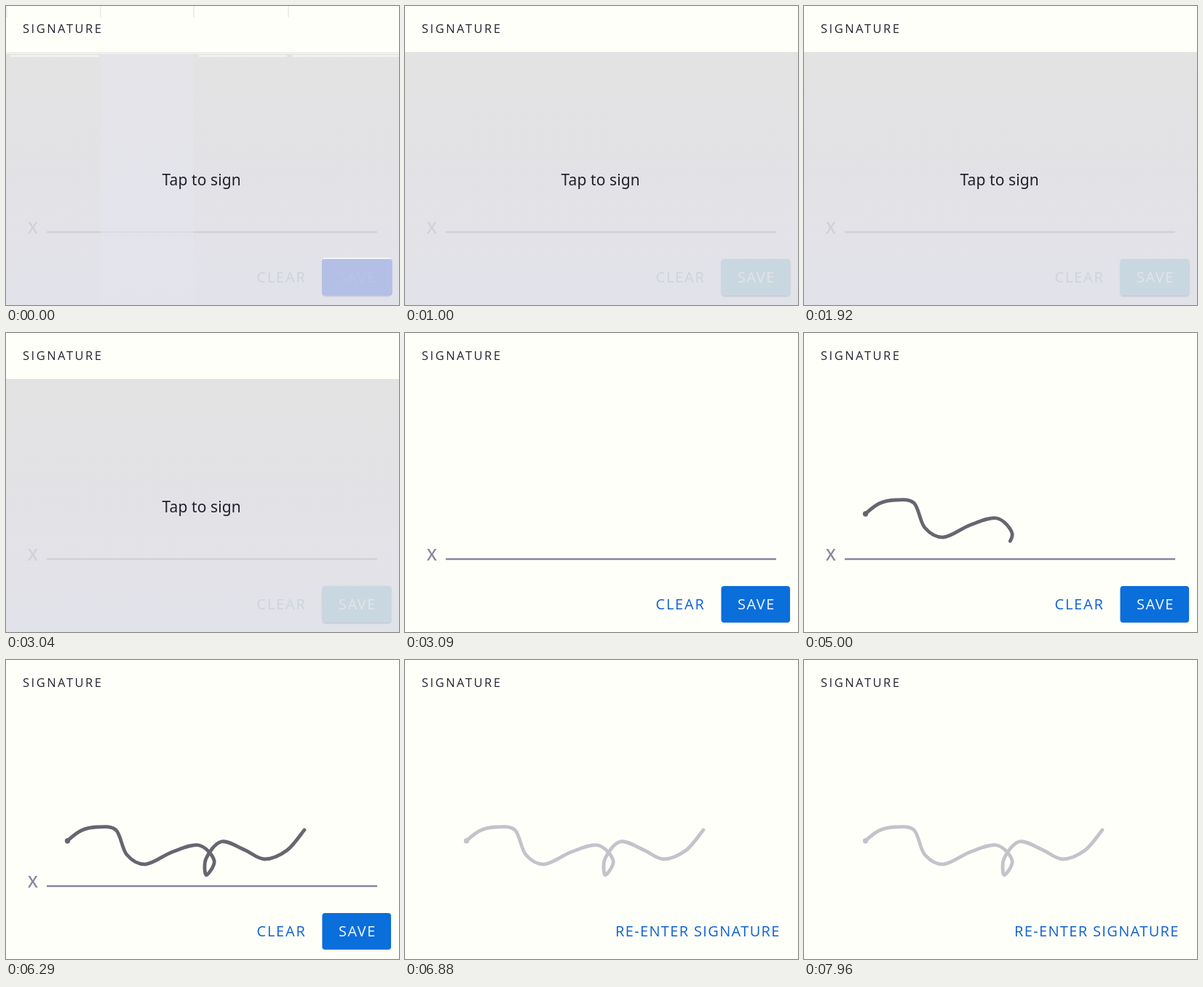
An HTML page for the animation above (8000 ms loop, 540 by 410 pixels).

```html
<!DOCTYPE html>
<html lang="en">
<head>
<meta charset="utf-8">
<title>Signature</title>
<style>
  html, body { margin: 0; width: 100%; height: 100%; overflow: hidden; background: #fffffa; }
  svg { display: block; width: 540px; height: 410px; font: 20px "Open Sans", sans-serif; letter-spacing: 1.5px; }
  .heading { font-size: 16.5px; letter-spacing: 2.5px; fill: #23232e; }
  .prompt { font: 21px "Noto Sans", sans-serif; letter-spacing: .1px; fill: #20202c; }
  .mark { font-size: 22px; font-weight: 600; fill: #85889f; }
  .rule { stroke: #85879f; stroke-width: 2.6; }
  .clear, .redo { fill: #0d61d3; }
  .clear { letter-spacing: 1.8px; }
  .redo { letter-spacing: 1.35px; }
  .button { fill: #0a6edb; }
  .save { fill: #f4f9ff; }
  .ink { fill: none; stroke: currentColor; stroke-width: 4.8; stroke-linecap: round; stroke-linejoin: round; }
  .dot { fill: currentColor; }
  #signature { color: #66666f; }
  .done #signature { color: #c3c3ca; }
  .locked .mark { fill: #d1d1d3; }
  .locked .rule { stroke: #d2d2d3; }
  .locked .clear { fill: #cdd4da; }
  .locked .button { fill: #c9d7e1; }
  .locked .save { fill: #e2e5e8; }
</style>
</head>
<body>
<svg id="stage" viewBox="0 0 540 410">
  <defs>
    <linearGradient id="shade" x2="0" y2="1">
      <stop offset="0" stop-color="#e3e3e3"/>
      <stop offset="1" stop-color="#e2e2ea"/>
    </linearGradient>
    <filter id="soft"><feGaussianBlur stdDeviation="1"/></filter>
  </defs>
  <rect width="540" height="410" fill="#fffffa"/>
  <rect id="veil" y="63" width="540" height="347" fill="url(#shade)"/>
  <text class="heading" x="23" y="37">SIGNATURE</text>

  <g id="form">
    <text class="mark" x="30" y="312">X</text>
    <path class="rule" d="M56 310H510"/>
    <text class="clear" x="344.5" y="379">CLEAR</text>
    <rect x="435" y="348" width="94" height="50" rx="4" fill="#58698a" opacity=".3" filter="url(#soft)"/>
    <rect class="button" x="434.5" y="347" width="94.5" height="50" rx="4"/>
    <text class="save" x="457" y="379">SAVE</text>
  </g>

  <g id="ghost">
    <path d="M130 63H258V410H130Z" fill="#e5e5ef" opacity=".5"/>
    <path d="M1 0V16M130 0V16M258 0V16M388 0V16" stroke="#eeeeec" stroke-width="2"/>
    <path d="M0 64.5H540" stroke="#efefec" stroke-width="3"/>
    <path d="M6 68.5H128M265 68.5H386M394 68.5H540" stroke="#f0f0f1" stroke-width="3"/>
    <rect x="434" y="347" width="97" height="50" rx="4" fill="#adb7e6" opacity=".75"/>
    <path d="M436 346H528" stroke="#f4f4f6" stroke-width="2"/>
  </g>
  <text id="prompt" class="prompt" x="214.5" y="245.5">Tap to sign</text>

  <g id="signature">
    <circle class="dot" cx="84.5" cy="248" r="3.7"/>
    <path id="ink" class="ink"/>
  </g>
  <text id="redo" class="redo" x="289" y="379">RE-ENTER SIGNATURE</text>
</svg>
<script>
const LOOP = 8000, UNLOCK = 3070, SAVED = 6580;
const PEN_DOWN = 3700, PEN_UP = 6020;
const $ = id => document.getElementById(id);
const show = (id, on) => { $(id).style.display = on ? '' : 'none'; };
const clamp = v => Math.min(1, Math.max(0, v));

// Turning points of the pen stroke.
const points = [
  [84, 248], [103, 234], [125, 229], [151, 233], [166, 267], [192, 280], [229, 263],
  [265, 254], [286, 275], [275, 295], [275, 272], [296, 249], [327, 260], [355, 273],
  [386, 261], [410, 233]
];

// Catmull-Rom spline written as cubic Bézier segments.
function spline(pts) {
  const at = i => pts[Math.min(pts.length - 1, Math.max(0, i))];
  const handle = (p, a, b, sign) => p.map((v, k) => v + sign * (b[k] - a[k]) / 6);
  return `M${pts[0]}` + pts.slice(1).map((end, i) => {
    const out = handle(at(i), at(i - 1), end, 1);
    const back = handle(end, at(i), at(i + 2), -1);
    return `C${out} ${back} ${end}`;
  }).join('');
}

const ink = $('ink');
ink.setAttribute('d', spline(points));
const length = ink.getTotalLength();
ink.style.strokeDasharray = `${length} ${length + 10}`;

function render(t) {
  const locked = t < UNLOCK, done = t >= SAVED;
  show('veil', locked);
  show('prompt', locked);
  show('form', !done);
  show('redo', done);
  show('signature', t >= PEN_DOWN);
  $('stage').setAttribute('class', locked ? 'locked' : done ? 'done' : '');
  ink.style.strokeDashoffset = length * (1 - clamp((t - PEN_DOWN) / (PEN_UP - PEN_DOWN)));
  $('ghost').style.opacity = 1 - clamp(t / 450);
}

const start = performance.now();
function tick() {
  render((performance.now() - start) % LOOP);
  requestAnimationFrame(tick);
}
tick();
</script>
</body>
</html>
```
